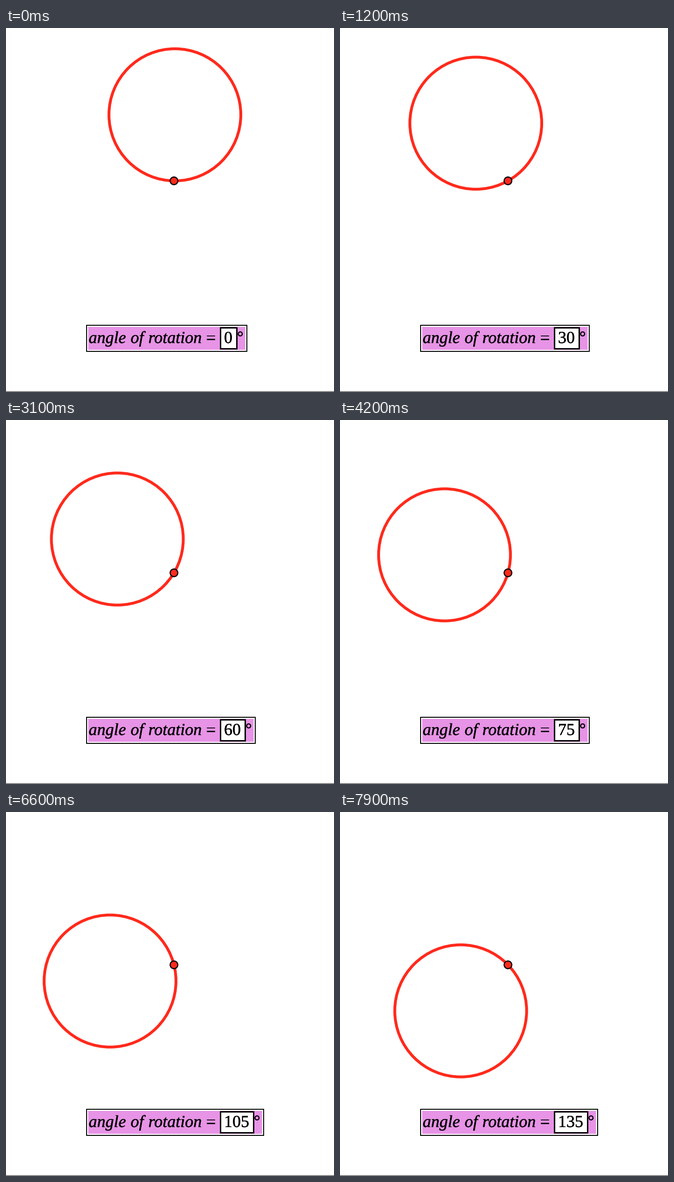
Write a matplotlib script that moves like this. It is 704 px wide and 780 px high and loops after 8 s.

```python
import numpy as np
import matplotlib.pyplot as plt
from matplotlib.animation import FuncAnimation
from matplotlib.patches import Circle, Rectangle
from matplotlib.patheffects import withStroke

W, H, DPI = 704, 780, 100
PT = 72 / DPI                      # points per pixel
FRAMES, INTERVAL = 80, 100
RED, PURPLE, PALE = "#ff2a1c", "#e793e6", "#f0bdef"
PIVOT, RADIUS = (360.5, 327.5), 141.5
STEP, HOLD, LEAD, TILT = 15, 9.4, 7.4, -0.8
DIGIT = 18                         # width of one digit
BASELINE = 675
DEGREE = (502.8, 655.5)

plt.rcParams["text.hinting"] = "none"
plt.rcParams["toolbar"] = "None"

fig = plt.figure(figsize=(W / DPI, H / DPI), dpi=DPI, facecolor="white")
ax = fig.add_axes([0, 0, 1, 1])
ax.set_xlim(0, W)
ax.set_ylim(H, 0)
ax.axis("off")


def box(x0, y0, x1, y1, color):
    return ax.add_patch(Rectangle((x0, y0), x1 - x0, y1 - y0, fc=color, lw=0))


def label(x, text, style="normal"):
    return ax.text(x, BASELINE, text, family="Liberation Serif", style=style,
                   size=36 * PT, color="black", va="baseline", ha="left",
                   path_effects=[withStroke(linewidth=0.5 * PT, foreground="black")])


def circle(center, radius, width, edge, fill="none"):
    return ax.add_patch(Circle(center, radius, fc=fill, ec=edge, lw=width * PT))


box(0, 778, W, 780, "#8a8a8a")

# Nested panel layers, each with its right edge for a one-digit value
layers = [
    (box(172, 636, 518, 694, "black"), 518),
    (box(174, 638, 516, 692, "white"), 516),
    (box(176, 640, 514, 690, PALE), 514),
    (box(177, 641, 513, 689, PURPLE), 513),
    (box(459, 641, 497, 689, "black"), 497),
    (box(462, 644, 494, 686, "white"), 494),
]
label(177.5, "angle", "italic")
label(267.5, "of", "italic")
label(305.5, "rotation", "italic")
label(429, "=")
value = label(468, "0")
degree = circle(DEGREE, 4.3, 2.4, "black")

ring = circle((0, 0), RADIUS, 6.1, RED)
circle(PIVOT, 8.2, 2.4, "black", RED)


def draw(i):
    angle = STEP * int((i + LEAD) // HOLD)
    a = np.radians(angle + TILT)
    ring.center = (PIVOT[0] - RADIUS * np.sin(a), PIVOT[1] - RADIUS * np.cos(a))
    text = str(angle)
    grow = DIGIT * (len(text) - 1)
    for rect, right in layers:
        rect.set_width(right + grow - rect.get_x())
    value.set_text(text)
    degree.center = (DEGREE[0] + grow, DEGREE[1])
    return ring, value, degree


anim = FuncAnimation(fig, draw, frames=FRAMES, interval=INTERVAL,
                     repeat=True, repeat_delay=0)
plt.show()
```
